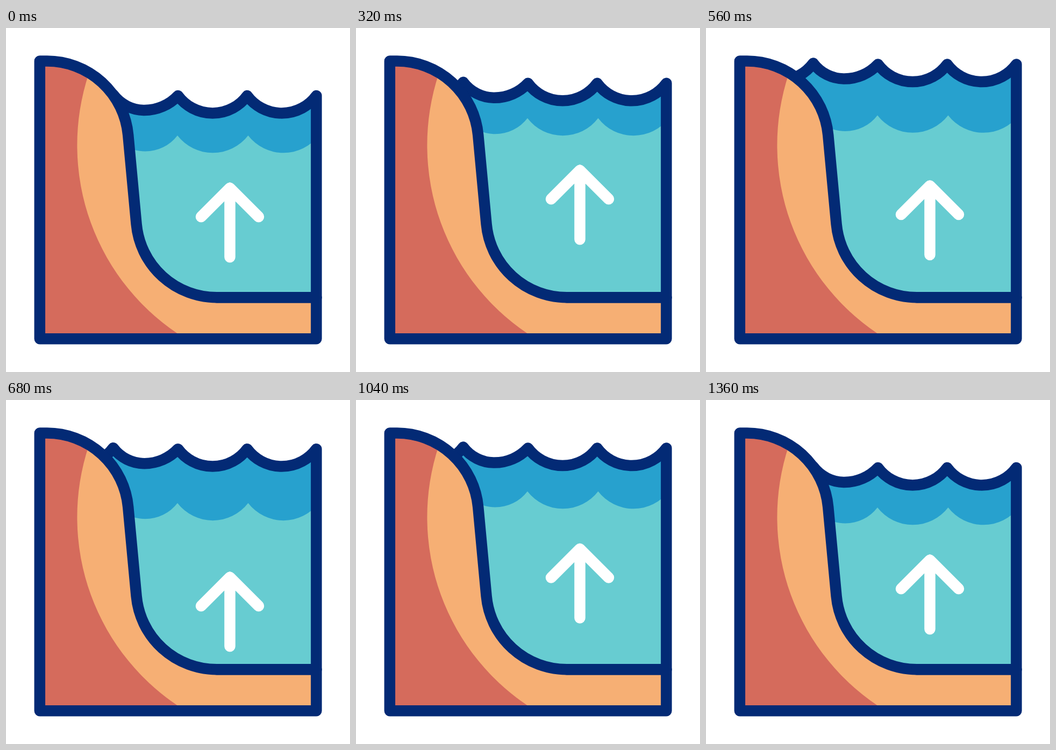
An HTML page that plays this animation: 640x640 px, repeating every 2 s.

```html
<!DOCTYPE html>
<html lang="en">
<head>
<meta charset="utf-8">
<title>Rising water level</title>
<style>
  html, body { margin: 0; height: 100%; overflow: hidden; background: #fff; }
  svg { display: block; width: 100%; height: 100%; }
  .line { fill: none; stroke: #032a75; stroke-width: 20.5; stroke-linejoin: round; stroke-linecap: round; }
</style>
</head>
<body>
<svg viewBox="0 0 640 640">
  <defs>
    <path id="water"/>
    <path id="hill" d="M62.8 61.5H76.5A151.5 151.5 0 0 1 227.2 199L242.6 364.9
                       A150 150 0 0 0 392 501.2H577.4V578.2H62.8Z"/>
  </defs>
  <use href="#water" fill="#27a1ce"/>
  <path id="shallow" fill="#67ccd1"/>
  <use href="#water" class="line"/>
  <path id="arrow" class="line" style="stroke: #fff" d="M363 351.3L416.5 297.8L470 351.3M416.5 297.8V426.3"/>
  <use href="#hill" fill="#f6af74"/>
  <path fill="#d56b5c" d="M62.8 61.5H76.5A151.5 151.5 0 0 1 154.3 84A422 422 0 0 0 334.3 578.2H62.8Z"/>
  <use href="#hill" class="line"/>
  <path class="line" d="M392 501.2H577.4"/>
</svg>
<script>
const LOOP = 2000, STEP = 40, END = 1360;
const el = id => document.getElementById(id);

// Rises, sinks and rises again through [time, offset] points, then settles at 0.
const swing = (start, ...points) => t => {
  let [t0, y0] = [start, 0];
  for (const [t1, y1] of [...points, [END, 0]]) {
    if (t < t1) {
      const p = Math.max(0, (t - t0) / (t1 - t0));
      return y0 + (y1 - y0) * (1 - Math.cos(Math.PI * p)) / 2;
    }
    [t0, y0] = [t1, y1];
  }
  return 0;
};

const surfaceShift = swing(140, [555, -58.5], [840, 0], [1080, -39]);
const bandShift = swing(120, [460, -50.5], [750, -1.5], [1045, -30]);
const arrowShift = swing(120, [395, -40], [745, 38.5], [1060, -21.5]);

// Arc that sags between two points, relative to the current one.
const sag = (r, dx, dy = 0) => `a${r} ${r} 0 0 0 ${dx} ${dy}`;

function draw(t) {
  const surface = 126 + surfaceShift(t), band = 200 + bandShift(t);
  el('water').setAttribute('d', `M71 ${surface - 2}` + sag(80, 128.5) + sag(72.5, 58, 29) +
    sag(85.8, 62.5, -27) + sag(80, 128.7).repeat(2) + 'V501.2H71Z');
  el('shallow').setAttribute('d', `M199 ${band}` + sag(75.8, 120) + sag(83, 131.5).repeat(2) + 'v360H199Z');
  el('arrow').setAttribute('transform', `translate(0 ${arrowShift(t)})`);
}

function frame() {
  const t = performance.now() % LOOP;
  draw(Math.floor(t / STEP) * STEP);
  requestAnimationFrame(frame);
}
frame();
</script>
</body>
</html>
```
